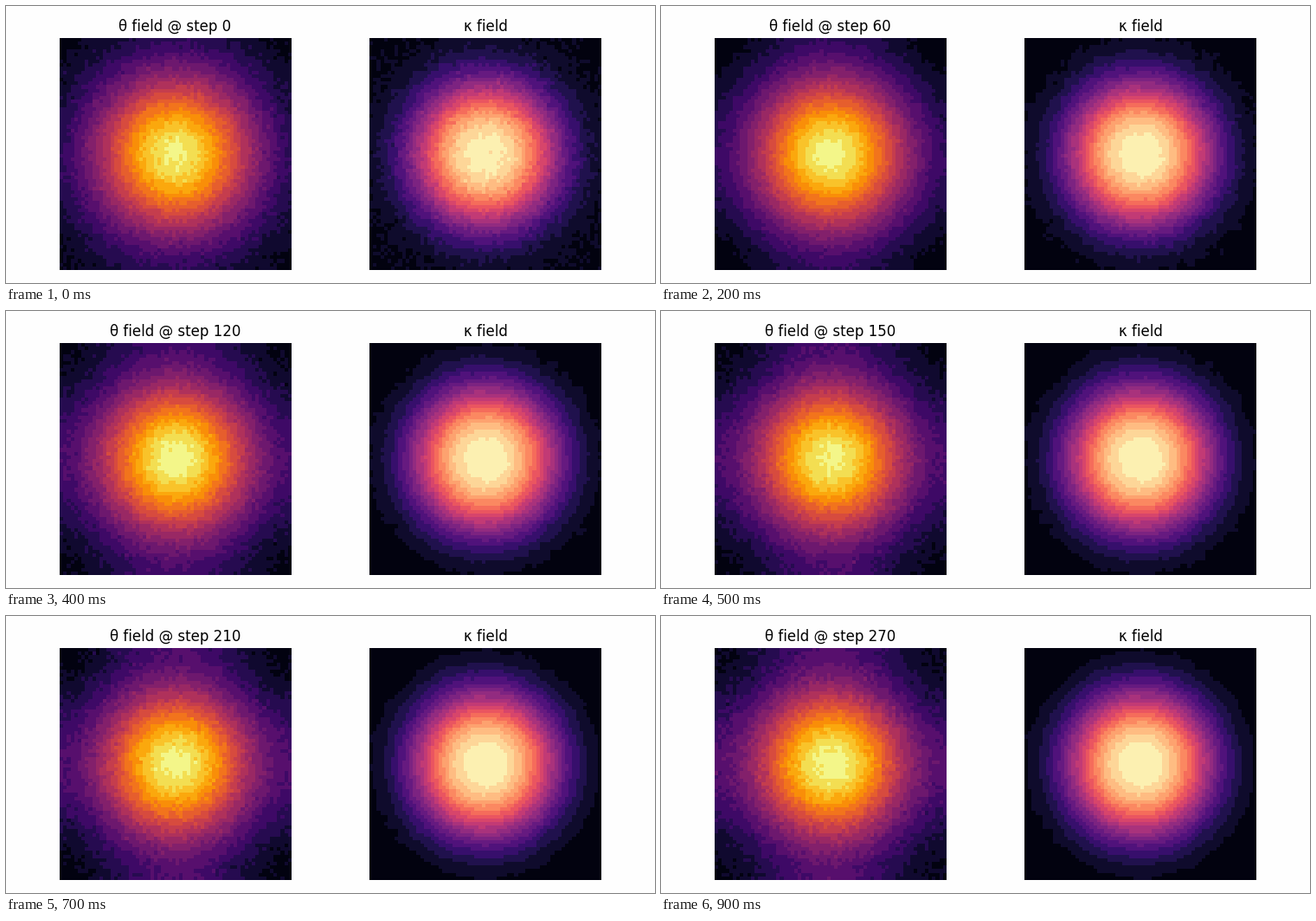
Write a matplotlib script that moves like this. It is 750x320 px and loops after 1 s.

```python
import numpy as np
import matplotlib.pyplot as plt
from matplotlib.animation import FuncAnimation
from matplotlib.colors import ListedColormap

WIDTH, HEIGHT, DPI = 750, 320, 100
CELLS, SIDE, BOTTOM = 64, 268, 15
FRAMES, INTERVAL, STEPS_PER_FRAME = 10, 100, 30
LEVELS = 18
SIGMA = CELLS / 4
GRAIN = 0.015

plt.rcParams["font.family"] = "DejaVu Sans"

axis = np.arange(CELLS) - (CELLS - 1) / 2
X, Y = np.meshgrid(axis, axis)
freq = 2 * np.pi * np.fft.fftfreq(CELLS)
K2 = freq[:, None] ** 2 + freq[None, :] ** 2


def noise(seed, spread=0.0):
    """White noise of unit strength, diffused by the given amount."""
    white = np.random.default_rng(seed).normal(size=(CELLS, CELLS))
    return np.fft.ifft2(np.fft.fft2(white) * np.exp(-spread * K2)).real


def gauss(u):
    return np.exp(-u ** 2 / (2 * SIGMA ** 2))


def theta_field(n):
    """Gaussian that leaks across the periodic border, with fresh grain."""
    wrap = min(1, n / 6)

    def profile(u):
        return gauss(u) + wrap * (gauss(u - CELLS) + gauss(u + CELLS))

    grain = GRAIN if n == 0 else GRAIN * (1 - 0.65 * np.exp(-(n - 1) / 1.5))
    return profile(X) * profile(Y) + grain * noise(10 + n)


def kappa_field(n):
    """Steep-sided bump whose grain diffuses away."""
    bump = np.exp(-(np.hypot(X, Y) / 20.3) ** 2.5)
    return bump + GRAIN * noise(5, 0.05 * n)


def banded(name):
    cmap = plt.get_cmap(name)
    return ListedColormap(cmap((np.arange(LEVELS) + 0.5) / LEVELS))


def add_panel(left, field, cmap, title):
    ax = fig.add_axes([left / WIDTH, BOTTOM / HEIGHT, SIDE / WIDTH, SIDE / HEIGHT])
    ax.axis("off")
    image = ax.imshow(field, cmap=banded(cmap), interpolation="nearest")
    return image, ax.set_title(title, fontsize=12)


def show(image, field):
    image.set_data(field)
    image.autoscale()


fig = plt.figure(figsize=(WIDTH / DPI, HEIGHT / DPI), dpi=DPI, facecolor="#fefefe")
theta, theta_title = add_panel(61.55, theta_field(0), "inferno", "θ field @ step 0")
kappa, _ = add_panel(420, kappa_field(0), "magma", "κ field")


def update(n):
    show(theta, theta_field(n))
    show(kappa, kappa_field(n))
    theta_title.set_text(f"θ field @ step {n * STEPS_PER_FRAME}")
    return theta, kappa, theta_title


anim = FuncAnimation(fig, update, frames=FRAMES, interval=INTERVAL, repeat=True,
                     repeat_delay=0, blit=False)
plt.show()
```
